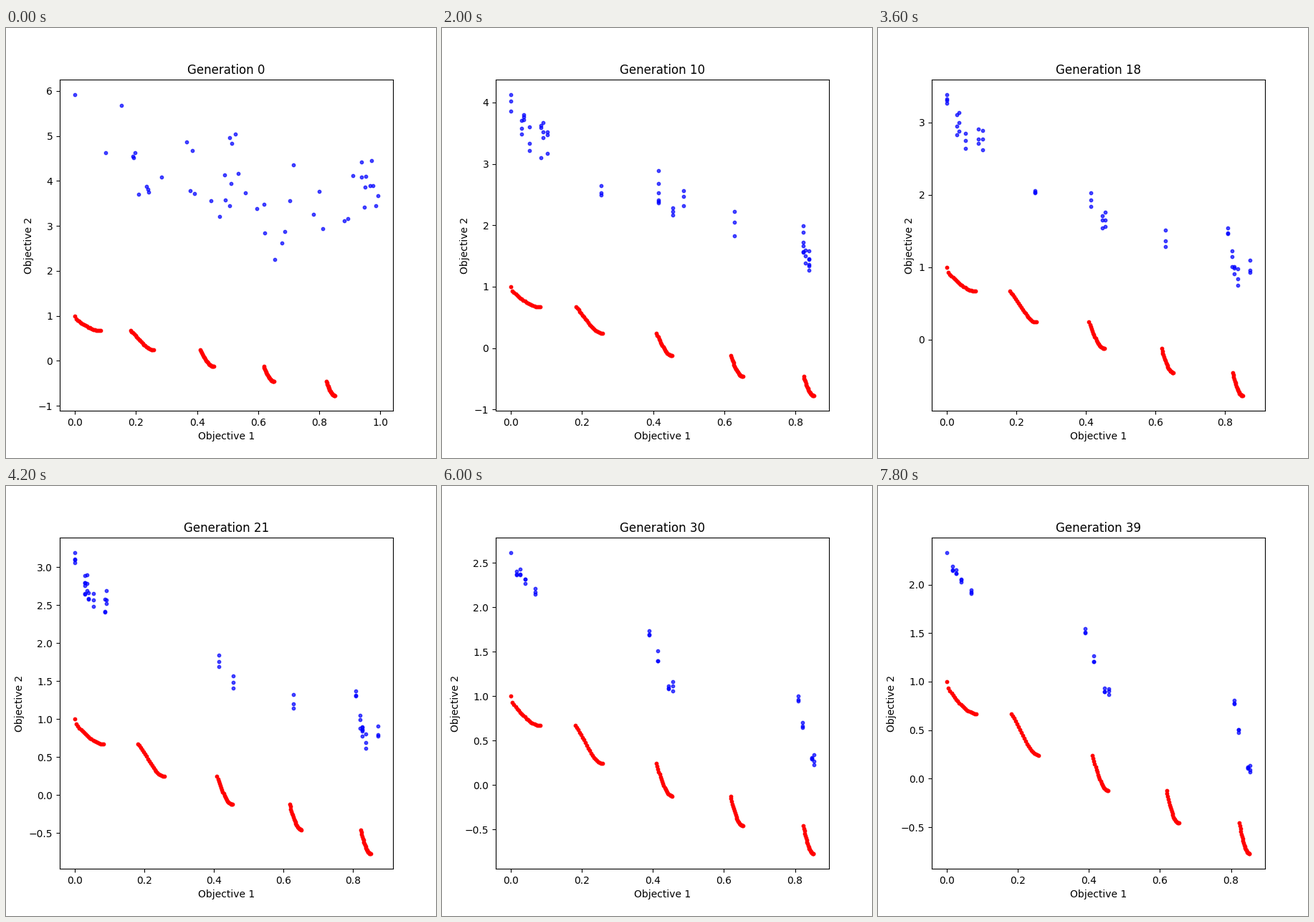
Recreate the animation shown at these times as a matplotlib script. Size 600 by 600 pixels, loop 8000 ms.

```python
import numpy as np
import matplotlib.pyplot as plt
from matplotlib.animation import FuncAnimation

GENERATIONS = 40
SLOTS = 3

# ZDT3: the stretches of Objective 1 that make up the true front
SEGMENTS = [(0.0, 0.0830015349), (0.182222872, 0.2577623634),
            (0.4093136748, 0.4538821041), (0.6183967944, 0.6525117038),
            (0.8233317983, 0.8518328654)]

# Objective 1 values kept alive in each phase of the search, by first generation
PHASES = {
    1: [.004, .031, .035, .085, .103, .12, .21, .242, .31, .415, .485,
        .629, .822, .827, .839],
    9: [0, .029, .035, .053, .091, .103, .254, .415, .448, .455, .629,
        .809, .821, .827, .838, .8725],
    21: [0, .029, .039, .053, .081, .087, .415, .448, .46, .81, .821, .827,
         .847],
    27: [0, .015, .025, .04, .068, .39, .413, .443, .456, .808, .82, .847,
         .853],
}


def zdt3(x, g):
    return g - np.sqrt(x * g) - x * np.sin(10 * np.pi * x)


def level(gen):
    return 2 + 3.5 * np.exp(-gen / 17)


def spread(gen):
    return 0.5 * np.exp(-gen / 14)


def top(gen):
    return np.interp(gen, [0, 6, 12, 13, 18, 25, 30, 39],
                     [5.92, 4.94, 3.72, 3.66, 3.384, 2.93, 2.617, 2.33])


rng = np.random.default_rng(4)

start_x = rng.uniform(0.02, 0.99, 49)
start_x *= 0.992 / start_x.max()
start_g = rng.normal(level(0), spread(0), 49)
start_y = zdt3(start_x, start_g)
# the worst of the first population are dropped first
start_end = 1 + 5 * np.argsort(np.argsort(-start_g)) // 49

lineages = []
starts = list(PHASES)
for first, following in zip(starts, starts[1:] + [GENERATIONS]):
    for x in PHASES[first]:
        born = first + rng.integers(0, 3)
        end = following + rng.integers(0, 3)
        lineages.append((x, born, end, rng.uniform(-1, 1, SLOTS)))


def population(gen):
    alive = start_end > gen
    xs, ys = [0, *start_x[alive]], [top(gen), *start_y[alive]]
    for x, born, end, offsets in lineages:
        if not born <= gen < end:
            continue
        for k, offset in enumerate(offsets):
            # each individual holds still until a better one replaces it
            since = max(born, gen - (gen + k) % SLOTS)
            xs.append(x)
            ys.append(zdt3(x, level(since) + offset * spread(since)))
    xs, ys = np.array(xs), np.array(ys)
    keep = ys <= top(gen)
    return xs[keep], ys[keep]


front_x = np.concatenate([np.linspace(a, b, 20) for a, b in SEGMENTS])
front_y = zdt3(front_x, 1)

fig, ax = plt.subplots(figsize=(6, 6), dpi=100)


def draw(gen):
    ax.clear()
    ax.scatter(*population(gen), s=10, c="blue", alpha=0.7)
    ax.scatter(front_x, front_y, s=10, c="red")
    ax.set_title(f"Generation {gen}")
    ax.set_xlabel("Objective 1")
    ax.set_ylabel("Objective 2")


anim = FuncAnimation(fig, draw, frames=GENERATIONS, init_func=lambda: draw(0),
                     interval=200, repeat=True, repeat_delay=0)
plt.show()
```
